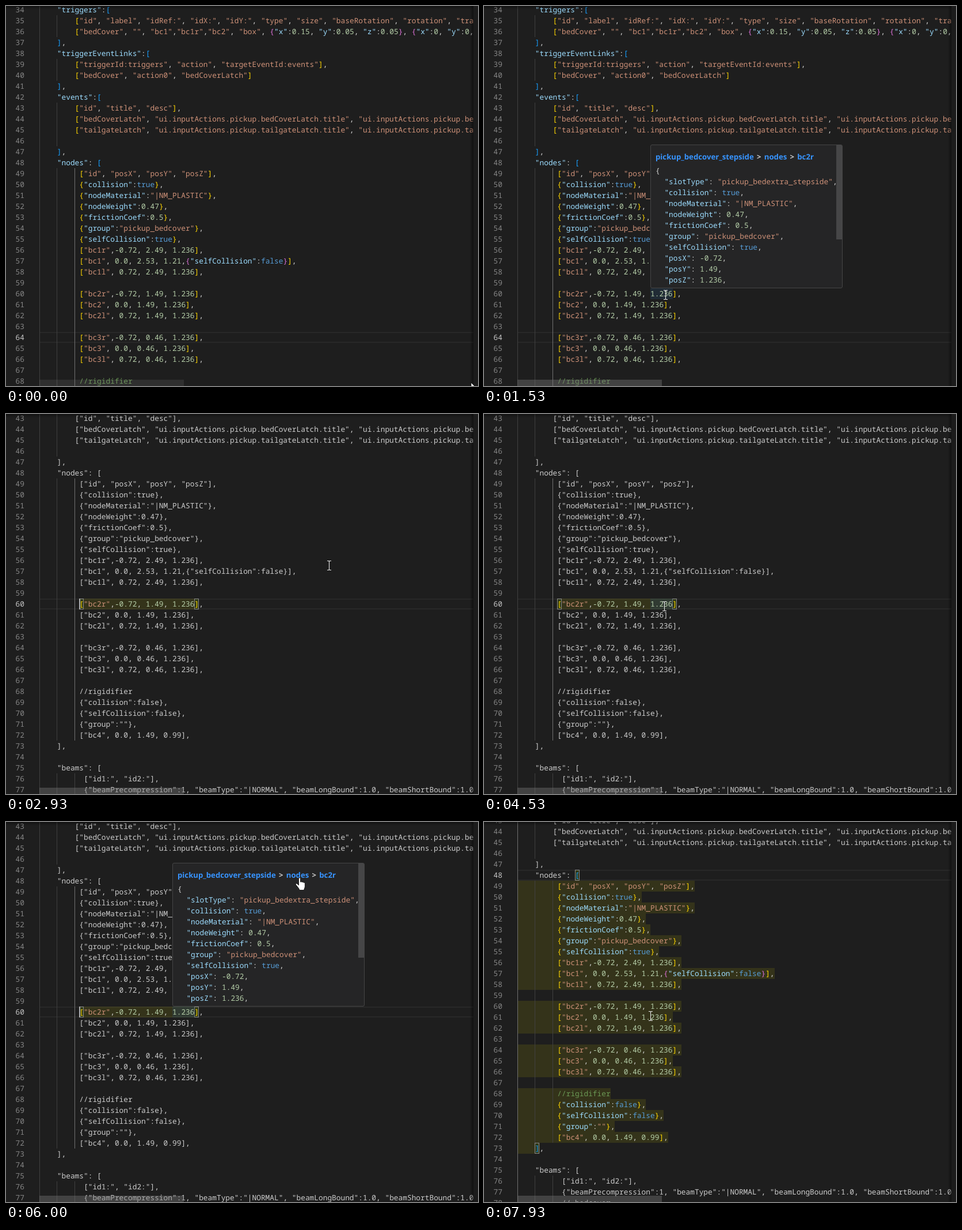
These frames come from a looping animation (820x661 px, 8 s). An HTML page:

```html
<!DOCTYPE html>
<html lang="en">
<head>
<meta charset="utf-8">
<title>Editor hover and jump</title>
<style>
  html, body { margin: 0; width: 100%; height: 100%; overflow: hidden; background: #1e1e1e; }
  #stage { position: absolute; left: 0; top: 0; width: 820px; height: 661px; overflow: hidden; background: #1e1e1e;
    font: 12.8333px/19px "Noto Sans Mono", "DejaVu Sans Mono", monospace; color: #d4d4d4;
    text-rendering: geometricPrecision; font-variant-ligatures: none; }
  #stage div, #stage svg { position: absolute; }
  #view { left: 0; top: 0; width: 812px; height: 661px; overflow: hidden; }
  #doc { left: 0; top: 0; width: 812px; height: 0; }
  .row { left: 0; width: 812px; height: 19px; white-space: pre; }
  .no { left: 16.6px; color: #858585; }
  .cur .no { color: #c6c6c6; }
  .code { left: 58px; }
  .key { color: #9cdcfe; }
  .str { color: #ce9178; }
  .num { color: #b5cea8; }
  .bool { color: #569cd6; }
  .com { color: #6a9955; }
  .b0 { color: #ffd700; }
  .b1 { color: #da70d6; }
  .b2 { color: #179fff; }
  .dim .code span { color: #ccc; }
  .dim.open .code .b2 { color: #179fff; }
  .guide { top: 0; width: 1px; height: 19px; background: #404040; }
  .inner .nodes .g2, .outer .g0 { background: #707070; }
  #line { left: 59px; width: 753px; height: 19px; box-sizing: border-box; border: solid #282828; border-width: 2px 0; }
  .mark { height: 19px; background: rgba(200, 190, 0, .13); }
  .pair { width: 8px; height: 19px; box-sizing: border-box; border: 1px solid #888; background: rgba(0, 100, 0, .1); }
  #word { height: 19px; background: rgba(38, 79, 120, .25); }
  #caret { width: 2px; height: 19px; background: #aeafad; }
  #tip { left: 289px; top: 241px; width: 334px; height: 250px; box-sizing: border-box; overflow: hidden;
    background: #252526; border: 1px solid #454545; border-radius: 3px; white-space: pre; }
  #path { left: 8px; top: 11px; font: 700 13.2px/19px "Open Sans", "Noto Sans", sans-serif; color: #3794ff; }
  #path i { font-style: normal; color: #ccc; margin: 0 1.8px; }
  #json { left: 8px; top: 35px; }
  .thumb { background: rgba(121, 121, 121, .4); }
  #tipBar { left: 322px; top: 0; width: 10px; height: 164px; }
  #bar { left: 58px; top: 650px; width: 251px; height: 11px; }
  #topShade { left: 0; top: 0; width: 812px; height: 6px; box-shadow: #000 0 6px 6px -6px inset; }
  #sideShade { left: 806px; top: 0; width: 6px; height: 661px; background: linear-gradient(90deg, transparent, rgba(0, 0, 0, .45)); }
  #edge { left: 812px; top: 0; width: 8px; height: 661px; background: #1b1b1b; }
  #mouse { left: 0; top: 0; overflow: visible; }
</style>
</head>
<body>
<div id="stage">
  <div id="view">
    <div id="doc">
      <div id="line"></div>
      <div id="marks1"></div>
      <div id="marks2"></div>
      <div id="word"></div>
      <div id="rows"></div>
      <div id="caret"></div>
      <div id="tip">
        <div id="path">pickup_bedcover_stepside <i>&gt;</i> nodes <i>&gt;</i> bc2r</div>
        <div id="json"></div>
        <div id="tipBar" class="thumb"></div>
      </div>
    </div>
  </div>
  <div id="bar" class="thumb"></div>
  <div id="topShade"></div>
  <div id="sideShade"></div>
  <div id="edge"></div>
  <svg id="mouse" width="1" height="1">
    <path id="beam" d="M-3.5-8h2.5l1 1 1-1h2.5M0-7V7M-3.5 8h2.5l1-1 1 1h2.5" fill="none" stroke="#e6e6e6" stroke-width="1.1"/>
    <path id="arrow" d="M0 0V16.2L3.8 12.7 6.3 18.6 9 17.4 6.5 11.7H11.6Z" fill="#fff" stroke="#000" stroke-width=".8"/>
    <path id="hand" transform="translate(-7.5 0)" fill="#fff" stroke="#000" stroke-width=".8"
      d="M6 1.5c0-2 3-2 3 0v6c.5-1.2 2.6-1 2.8.4.6-1 2.6-.8 2.7.7.8-.7 2.4-.3 2.4 1.2v5c0 3-1.5 4-1.7 6.7H7.5C7 19 4.5 16.5 1 12c-1-1.6 1-2.8 2.3-1.5L6 13z"/>
  </svg>
</div>
<script>
const LOOP = 8000, STEP = 200 / 3;
const FIRST = 34, ROW = 19, LEFT = 58, CHAR = 7.7;

// One entry per line: indent column, then the text.
const source = `4"triggers":[
8["id", "label", "idRef:", "idX:", "idY:", "type", "size", "baseRotation", "rotation", "translation"],
8["bedCover", "", "bc1","bc1r","bc2", "box", {"x":0.15, "y":0.05, "z":0.05}, {"x":0, "y":0, "z":0}],
4],
4"triggerEventLinks":[
8["triggerId:triggers", "action", "targetEventId:events"],
8["bedCover", "action0", "bedCoverLatch"]
4],
4"events":[
8["id", "title", "desc"],
8["bedCoverLatch", "ui.inputActions.pickup.bedCoverLatch.title", "ui.inputActions.pickup.bedCoverLatch.desc"],
8["tailgateLatch", "ui.inputActions.pickup.tailgateLatch.title", "ui.inputActions.pickup.tailgateLatch.desc"],
8
4],
4"nodes": [
9["id", "posX", "posY", "posZ"],
9{"collision":true},
9{"nodeMaterial":"|NM_PLASTIC"},
9{"nodeWeight":0.47},
9{"frictionCoef":0.5},
9{"group":"pickup_bedcover"},
9{"selfCollision":true},
9["bc1r",-0.72, 2.49, 1.236],
9["bc1", 0.0, 2.53, 1.21,{"selfCollision":false}],
9["bc1l", 0.72, 2.49, 1.236],
9
9["bc2r",-0.72, 1.49, 1.236],
9["bc2", 0.0, 1.49, 1.236],
9["bc2l", 0.72, 1.49, 1.236],
9
9["bc3r",-0.72, 0.46, 1.236],
9["bc3", 0.0, 0.46, 1.236],
9["bc3l", 0.72, 0.46, 1.236],
9
9//rigidifier
9{"collision":false},
9{"selfCollision":false},
9{"group":""},
9["bc4", 0.0, 1.49, 0.99],
4],
4
4"beams": [
A["id1:", "id2:"],
A{"beamPrecompression":1, "beamType":"|NORMAL", "beamLongBound":1.0, "beamShortBound":1.0},
A// bedcover`.split("\n").map(s => ({ col: parseInt(s[0], 16), text: s.slice(1) }));

const tipText = `{
  "slotType": "pickup_bedextra_stepside",
  "collision": true,
  "nodeMaterial": "|NM_PLASTIC",
  "nodeWeight": 0.47,
  "frictionCoef": 0.5,
  "group": "pickup_bedcover",
  "selfCollision": true,
  "posX": -0.72,
  "posY": 1.49,
  "posZ": 1.236,`;

const $ = id => document.getElementById(id);
const rowTop = n => (n - FIRST) * ROW - 3;
const colX = c => LEFT + c * CHAR;

function add(parent, cls, style = {}) {
  const el = document.createElement("div");
  el.className = cls;
  for (const k in style) el.style[k] = typeof style[k] === "number" ? style[k] + "px" : style[k];
  parent.append(el);
  return el;
}

let depth = 2;
function paint(text, brackets = true) {
  const token = /\/\/.*|"[^"]*"(?=\s*:)|"[^"]*"|true|false|-?\d+(\.\d+)?|[[\]{}]/g;
  return text.replace(token, s => {
    let cls = "num";
    if (s.startsWith("//")) cls = "com";
    else if (s[0] === '"') cls = "str";
    else if (/^[tf]/.test(s)) cls = "bool";
    else if ("[{".includes(s)) cls = "b" + depth++ % 3;
    else if ("]}".includes(s)) cls = "b" + --depth % 3;
    if (cls[0] === "b" && cls.length === 2 && !brackets) return s;
    return `<span class="${cls}">${s}</span>`;
  }).replace(/<span class="str">("[^"]*")<\/span>(?=\s*:)/g, '<span class="key">$1</span>');
}

const rows = source.map(({ col, text }, i) => {
  const n = FIRST + i;
  const row = add($("rows"), n > 48 && n < 73 ? "row nodes" : "row", { top: rowTop(n) });
  for (let k = 0; k * 4 < col; k++) add(row, "guide g" + k, { left: Math.floor(colX(k * 4)) });
  add(row, "no").textContent = n;
  add(row, "code", { left: colX(col) }).innerHTML = paint(text);
  return row;
});
$("json").innerHTML = paint(tipText, false);

function mark(parent, n, from, to) {
  add(parent, "mark", { top: rowTop(n), left: colX(from), width: (to - from) * CHAR });
}
function pair(parent, n, col) {
  add(parent, "pair", { top: rowTop(n), left: Math.floor(colX(col)) });
}
mark($("marks1"), 60, 9, 36);
pair($("marks1"), 60, 9);
pair($("marks1"), 60, 35);
mark($("marks2"), 48, 13, 14);
for (let n = 49; n < 73; n++) {
  const { col, text } = source[n - FIRST];
  if (text) mark($("marks2"), n, 0, col + text.length);
}
mark($("marks2"), 73, 0, 5);
pair($("marks2"), 48, 13);
pair($("marks2"), 73, 4);
Object.assign($("word").style, { top: rowTop(60) + "px", left: colX(30) + "px", width: 5 * CHAR + "px" });

// Pointer path: time, x, y
const track = [
  [0, 808, 655], [870, 303, 513], [1000, 303, 513], [1130, 315, 502], [2000, 315, 502],
  [2400, 531, 273], [2600, 561, 263], [3400, 561, 264], [4200, 313, 334], [4870, 313, 334],
  [5670, 511, 101], [5930, 510, 97], [6330, 510, 97], [6530, 510, 104], [6800, 504, 153],
  [7400, 311, 354], [7530, 306, 358], [7930, 289, 337], [8000, 289, 337]
];
const shapes = [
  [0, "arrow"], [130, "beam"], [2130, "arrow"], [2460, "hand"], [2930, "beam"],
  [5000, "arrow"], [5730, "hand"], [6330, "beam"]
];
const views = [
  { at: 0, line: 64, scroll: 0 },
  { at: 2800, line: 60, scroll: 170, caret: 9 },
  { at: 6200, line: 48, scroll: 180, caret: 13 }
];
const hovers = [[1400, 1430, 2800], [4500, 4560, 6200]];

const last = (list, test) => list.filter(test).pop();

function slope(i, a) {
  const p = track[i], q = track[i + 1];
  return p && q ? (q[a] - p[a]) / (q[0] - p[0]) : 0;
}
function tangent(i, a) {
  if (i === 0) return slope(0, a);
  const s = slope(i - 1, a), r = slope(i, a);
  return s * r > 0 ? 2 * s * r / (s + r) : 0;
}
// Monotone cubic through the track points
function along(t, a) {
  let i = 0;
  while (i < track.length - 2 && track[i + 1][0] <= t) i++;
  const p = track[i], q = track[i + 1], d = q[0] - p[0], u = Math.min(1, (t - p[0]) / d);
  const w = u * u * (3 - 2 * u);
  return p[a] * (1 - w) + q[a] * w
    + d * u * (1 - u) * ((1 - u) * tangent(i, a) - u * tangent(i + 1, a));
}

const show = (id, on) => { $(id).style.display = on ? "block" : "none"; };

function setRows(view, lit) {
  rows.forEach((row, i) => {
    const n = FIRST + i;
    const inside = view === 0 || (view === 1 ? n === 60 : n > 48 && n < 74);
    row.classList.toggle("cur", n === views[view].line);
    row.classList.toggle("dim", lit > 0 && !inside);
    row.classList.toggle("open", view === 2 && n === 48);
  });
}

let shown = "";
function draw(time) {
  const t = Math.floor((time + 4) / STEP) * STEP % LOOP;
  const view = last(views, v => v.at <= t), v = views.indexOf(view);
  const lit = v && t >= view.at + 60 ? 1 : 0;

  if (shown !== v + "," + lit) {
    shown = v + "," + lit;
    setRows(v, lit);
    $("doc").className = v === 2 ? "outer" : "inner";
    $("doc").style.transform = `translateY(${-view.scroll}px)`;
    $("line").style.top = rowTop(view.line) + "px";
    show("marks1", v === 1 && lit);
    show("marks2", v === 2 && lit);
  }

  const blink = Math.max(0, t - view.at - 60) % 1000 < 500;
  show("caret", v && blink);
  if (v) {
    $("caret").style.left = Math.floor(colX(view.caret)) + "px";
    $("caret").style.top = rowTop(view.line) + "px";
  }

  const hover = hovers.find(h => t >= h[0] && t < h[2]);
  show("word", hover);
  show("tip", hover && t > hover[1]);
  if (hover) $("tip").style.opacity = Math.min(1, Math.max(0, (t - hover[1]) / 100));

  $("bar").style.opacity = Math.min(1, .45 + t / 200);

  const shape = last(shapes, s => s[0] <= t + 4)[1];
  for (const s of ["beam", "arrow", "hand"]) show(s, s === shape);
  const half = shape === "beam" ? .5 : 0;
  const x = Math.round(along(t, 1)) + half, y = Math.round(along(t, 2)) + half;
  $("mouse").style.transform = `translate(${x}px, ${y}px)`;
}

const start = performance.now();
function tick() {
  draw((performance.now() - start) % LOOP);
  requestAnimationFrame(tick);
}
tick();
</script>
</body>
</html>
```
